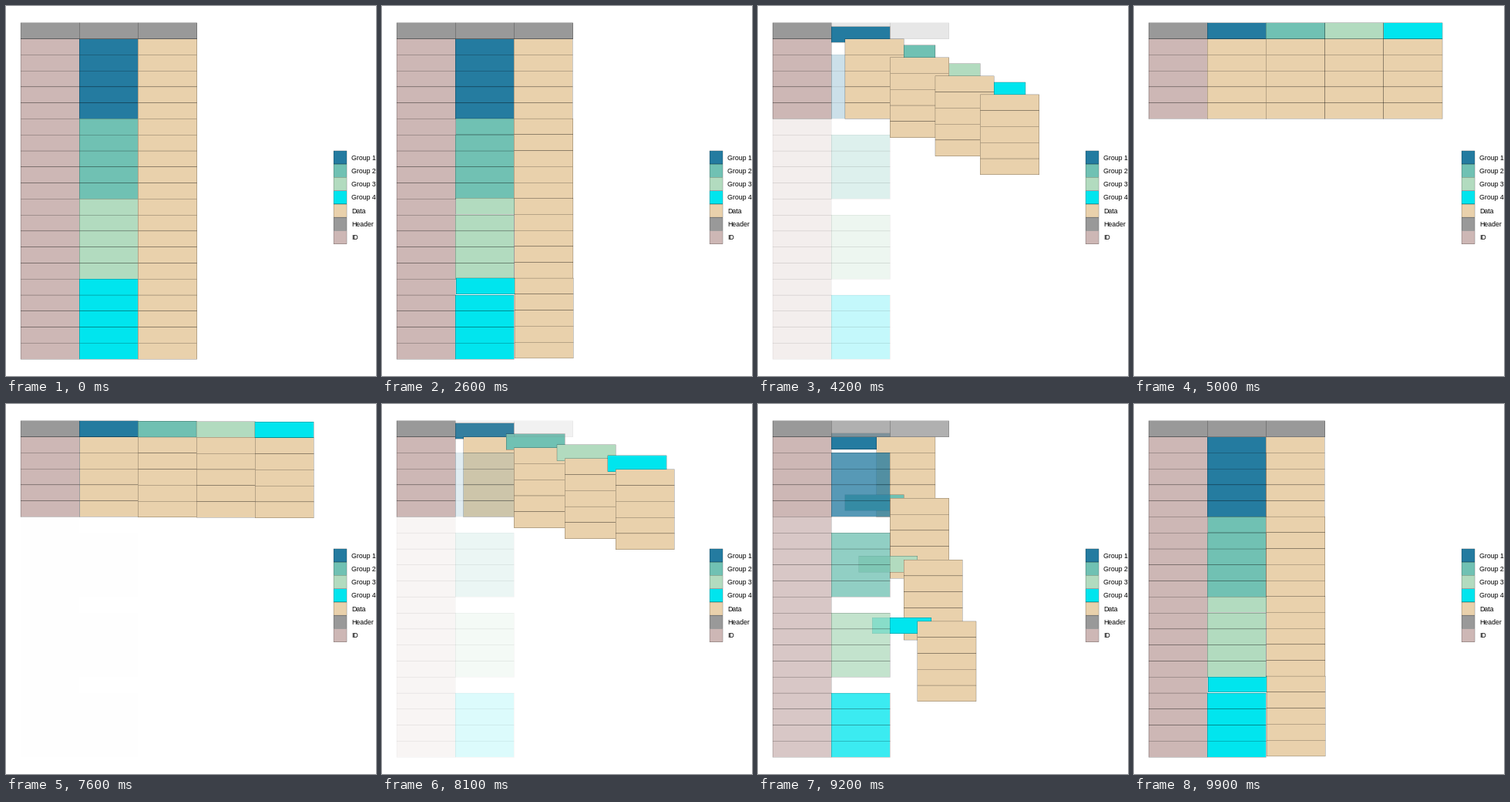
Animation, 480 px wide and 480 px high, one loop 10 s. Source, as a matplotlib script:

```python
import math

import matplotlib.pyplot as plt
from matplotlib.animation import FuncAnimation
from matplotlib.collections import PolyCollection
from matplotlib.colors import to_rgb

SIZE, DPI = 480, 72
FRAMES, STEP = 100, 25          # 100 ms per frame, four phases of 25 frames
CELL_W, CELL_H = 76.2, SIZE / 23.1
LEFT, TOP = CELL_W / 4, CELL_H * 1.05
LINE = 0.2134

GROUPS = ["#247BA0", "#70C1B3", "#B2DBBF", "#00E5EE"]
DATA, HEADER, ID = "#E9D1AC", "#999999", "#CDB7B5"
ROWS = 5                        # rows per group


def make_tiles():
    """Tiles as (long cell, wide cell or None, colour), column by column."""
    total = ROWS * len(GROUPS)
    tiles = [((0, 0), (0, 0), HEADER)]
    for r in range(total):
        cell = (0, r + 1)
        tiles.append((cell, cell if r < ROWS else None, ID))
    tiles.append(((1, 0), None, HEADER))
    for r in range(total):
        g, k = divmod(r, ROWS)
        tiles.append(((1, r + 1), (g + 1, 0) if k == 0 else None, GROUPS[g]))
    tiles.append(((2, 0), None, HEADER))
    for r in range(total):
        g, k = divmod(r, ROWS)
        tiles.append(((2, r + 1), (g + 1, k + 1), DATA))
    return tiles


TILES = make_tiles()
KEPT = sorted((t for t in TILES if t[1]), key=lambda t: t[1])
FADING = [t for t in TILES if not t[1]]


def rect(x0, y0, x1, y1):
    return [(x0, y0), (x1, y0), (x1, y1), (x0, y1)]


def snap(v):
    return math.ceil(v - 0.5)


class Painter:
    """Collects crisp fills and hairline outlines in drawing order."""

    def __init__(self, ax):
        self.coll = PolyCollection([], snap=False)
        ax.add_collection(self.coll, autolim=False)
        self.clear()

    def clear(self):
        self.verts, self.faces, self.edges, self.widths = [], [], [], []

    def add(self, x, y, w, h, color, alpha=1.0):
        box = (x, y, x + w, y + h)
        self.verts += [rect(*map(snap, box)), rect(*box)]
        self.faces += [(*to_rgb(color), alpha), (0, 0, 0, 0)]
        self.edges += [(0, 0, 0, 0), (0, 0, 0, alpha)]
        self.widths += [0, LINE]

    def flush(self):
        self.coll.set_verts(self.verts)
        self.coll.set_facecolor(self.faces)
        self.coll.set_edgecolor(self.edges)
        self.coll.set_linewidth(self.widths)


def ease(t):
    return (1 - math.cos(math.pi * t)) / 2


def scene(frame):
    """Return (wideness 0..1, tiles in drawing order)."""
    phase, step = divmod(frame, STEP)
    t = ease(step / STEP)
    if phase == 0:
        return 0, TILES
    if phase == 1:
        return t, TILES
    if phase == 2 or step == 0:
        return 1, KEPT
    return 1 - t, KEPT + FADING


fig = plt.figure(figsize=(SIZE / DPI, SIZE / DPI), dpi=DPI, facecolor="white")
ax = fig.add_axes([0, 0, 1, 1])
ax.set_xlim(0, SIZE)
ax.set_ylim(SIZE, 0)
ax.axis("off")


def draw_legend():
    key, x, y = 17.28, 424.9, 187.8
    labels = [f"Group {i + 1}" for i in range(len(GROUPS))] + ["Data", "Header", "ID"]
    painter = Painter(ax)
    for i, (label, color) in enumerate(zip(labels, GROUPS + [DATA, HEADER, ID])):
        top = y + i * key
        painter.add(x + 0.14, top + 0.14, key - 0.28, key - 0.28, color)
        ax.text(x + key + 5.6, top + key / 2 + 3.1, label, fontsize=8.8,
                family="Liberation Sans", color="black", va="baseline")
    painter.flush()


draw_legend()
table = Painter(ax)


def update(frame):
    wide, tiles = scene(frame)
    table.clear()
    for start, end, color in tiles:
        c, r = start
        if end:
            c += (end[0] - c) * wide
            r += (end[1] - r) * wide
        alpha = 1 if end else 1 - wide
        table.add(LEFT + c * CELL_W, TOP + r * CELL_H, CELL_W, CELL_H, color, alpha)
    table.flush()
    return [table.coll]


anim = FuncAnimation(fig, update, frames=FRAMES, interval=100,
                     init_func=lambda: update(0), repeat=True, repeat_delay=0)
plt.show()
```
